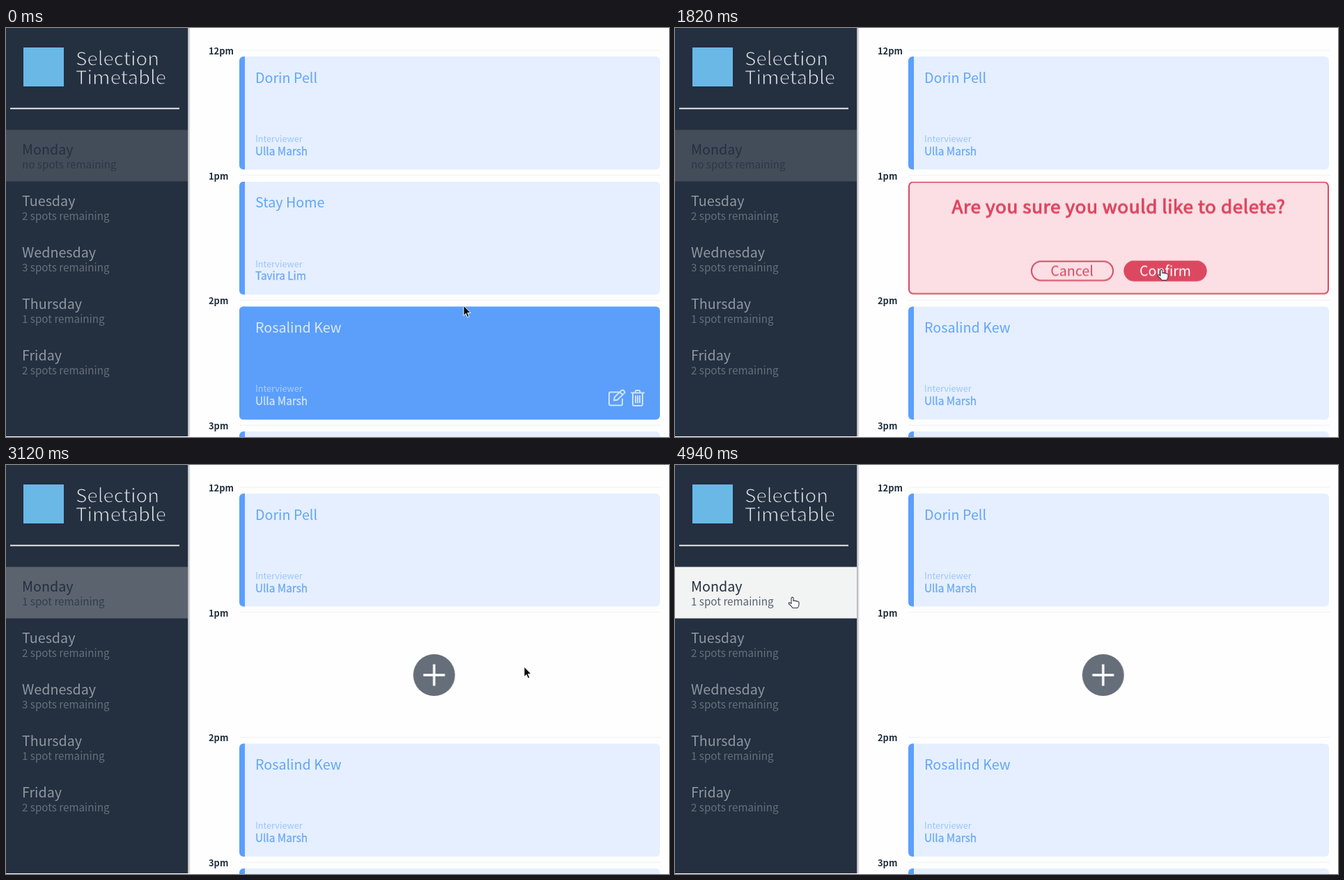
Write an HTML page that moves like this. It is 952x588 px and loops after 5.2 s.

```html
<!DOCTYPE html>
<html lang="en">
<head>
<meta charset="utf-8">
<title>Booking board</title>
<style>
  html, body { margin: 0; width: 100%; height: 100%; overflow: hidden; background: #fefefe; }
  svg { display: block; width: 100%; height: 100%; }
  text { font: 400 19.7px "Noto Sans CJK JP", "Noto Sans CJK SC", "Noto Sans CJK", "Open Sans", sans-serif; }

  /* A stroke in the background colour thins the letters, one in the text colour thickens them. */
  .title { font-size: 27.6px; fill: #dfe4e8; stroke: #242f3f; stroke-width: .9px; }
  .day { fill: #8f98a1; }
  .spots { font-size: 15.2px; fill: #66707b; }
  .panel text { fill: #222f3e; }
  .panel .spots { fill: #56616d; }
  .hour { font-size: 12.9px; font-weight: 700; fill: #222f3e; }
  .role { font-size: 12.7px; }
  .person { font-size: 15.3px; stroke-width: .3px; }
  .big { font-size: 26.2px; letter-spacing: .55px; stroke-width: 1px; }
  .mid { text-anchor: middle; }

  .booked .name { fill: #62a6f8; }
  .booked .role { fill: #9cc5fb; }
  .booked .person { fill: #6aa9f8; stroke: #6aa9f8; }
  .active .name { fill: #dbe9fe; }
  .active .role { fill: #a9cdfd; }
  .active .person { fill: #d5e5fe; stroke: #d5e5fe; }
  .icons { fill: none; stroke: #cfe2fe; stroke-width: 2; stroke-linejoin: round; stroke-linecap: round; }
  .danger { fill: #dd455e; stroke: #dd455e; }
  .label { fill: #dd455e; }
  .outline { fill: none; stroke: #dc4860; stroke-width: 2; }

  .anim { animation: 5.2s step-end infinite; }
  .third-active { animation-name: third-active; }
  .second-active { animation-name: second-active; }
  .confirm { animation-name: confirm; }
  .confirm-hot { animation-name: confirm-hot; }
  .deleting { animation-name: deleting; }
  .after { animation-name: after; }
  .before { animation-name: before; }
  .panel { animation-name: panel; }
  .cursor { animation-name: move; }
  .arrow { animation-name: arrow; }
  .hand { animation-name: hand; }
  .spin { animation: spin 1.04s steps(8) infinite; }

  @keyframes third-active { 0% { opacity: 1 } 2.5%, 100% { opacity: 0 } }
  @keyframes second-active { 0%, 20%, 100% { opacity: 0 } 2.5% { opacity: 1 } }
  @keyframes confirm { 0%, 40%, 100% { opacity: 0 } 20% { opacity: 1 } }
  @keyframes confirm-hot { 0%, 40%, 100% { opacity: 0 } 30% { opacity: 1 } }
  @keyframes deleting { 0%, 60%, 100% { opacity: 0 } 40% { opacity: 1 } }
  @keyframes after { 0% { opacity: 0 } 60%, 100% { opacity: 1 } }
  @keyframes before { 0% { opacity: 1 } 60%, 100% { opacity: 0 } }
  @keyframes panel { 0% { opacity: .155 } 60% { opacity: .27 } 62.5%, 100% { opacity: 1 } }
  @keyframes move {
    0% { transform: translate(657px, 399px) }
    2.5% { transform: translate(745px, 335px) }
    7.5% { transform: translate(793px, 292px) }
    12.5% { transform: translate(872px, 330px) }
    15% { transform: translate(907px, 351px) }
    25% { transform: translate(810px, 352px) }
    30% { transform: translate(697px, 347px) }
    40% { transform: translate(697px, 347px); animation-timing-function: steps(8) }
    60% { transform: translate(744px, 290px) }
    80% { transform: translate(409px, 274px) }
    87.5% { transform: translate(240px, 206px) }
    92.5% { transform: translate(185px, 194px) }
    95%, 100% { transform: translate(167px, 190px) }
  }
  @keyframes arrow {
    0%, 25%, 42.5% { opacity: 1 }
    15%, 30%, 87.5%, 100% { opacity: 0 }
  }
  @keyframes hand {
    0%, 25%, 42.5% { opacity: 0 }
    15%, 30%, 87.5%, 100% { opacity: 1 }
  }
  @keyframes spin { to { transform: rotate(360deg) } }
</style>
</head>
<body>
<svg viewBox="0 0 952 588">
  <defs>
    <linearGradient id="shade">
      <stop offset="0" stop-color="#222f3e" stop-opacity=".4"/>
      <stop offset="1" stop-color="#222f3e" stop-opacity="0"/>
    </linearGradient>
    <g id="icons" class="icons">
      <path d="M545 123H533a2 2 0 0 0-2 2V140a2 2 0 0 0 2 2H548a2 2 0 0 0 2-2V133"/>
      <path d="M538 135L539 130 549 120.500Q550.500 119.500 552 121L553 122Q554 123.500 553 124.500L543 134Z M546.500 123L550.500 127"/>
      <path d="M563 124H581 M568 124L569.500 120.500H574.500L576 124 M565 124V140.500a2 2 0 0 0 2 2H577a2 2 0 0 0 2-2V124 M569 128.500V138 M572 128.500V138 M575 128.500V138"/>
    </g>
  </defs>

  <rect width="952" height="588" fill="#fefefe"/>
  <rect x="261" width="4" height="587" fill="url(#shade)"/>
  <rect width="261" height="587" fill="#242f3f"/>
  <rect x="25" y="28" width="58" height="56" fill="#69b8e6"/>
  <text class="title" x="100" y="53.500">Selection</text>
  <text class="title" x="100" y="80.500">Timetable</text>
  <rect x="6" y="114.700" width="243" height="2" fill="#e6e9ec"/>

  <g class="panel anim">
    <rect y="146.500" width="261" height="74" fill="#f2f4f3"/>
    <text x="23" y="181.500">Monday</text>
    <text class="spots before anim" x="23" y="202">no spots remaining</text>
    <text class="spots after anim" x="23" y="202">1 spot remaining</text>
  </g>
  <g id="days"></g>
  <g id="slots"></g>

  <g class="confirm anim" transform="translate(335 220.500)">
    <rect x="1" y="1" width="602" height="160.500" rx="6" fill="#fbdfe4" stroke="#dc4860" stroke-width="2"/>
    <text class="big danger mid" x="302" y="46">Are you sure you would like to delete?</text>
    <rect class="outline" x="177" y="115" width="117" height="27.500" rx="13.700"/>
    <text class="label mid" x="235" y="135.500">Cancel</text>
    <rect class="outline" x="310.500" y="115" width="117" height="27.500" rx="13.700"/>
    <text class="label mid" x="369" y="135.500">Confirm</text>
    <g class="confirm-hot anim">
      <rect x="309.500" y="114" width="119" height="29.500" rx="14.700" fill="#dc4860"/>
      <text class="mid" x="369" y="135.500" fill="#fff">Confirm</text>
    </g>
  </g>

  <g class="deleting anim">
    <rect x="335" y="220.500" width="604" height="162.500" rx="6" fill="#242f3f"/>
    <g transform="translate(558 302)" fill="none">
      <circle r="20.500" stroke="#454e5b" stroke-width="4.500"/>
      <g class="spin">
        <circle r="20.500" stroke="#f2f3f4" stroke-width="4.500" pathLength="360" stroke-dasharray="97 263" transform="rotate(108)"/>
      </g>
    </g>
    <text class="big" x="610" y="312" fill="#f0f2f4" stroke="#f0f2f4">DELETING</text>
  </g>

  <g class="after anim" transform="translate(614.700 302)">
    <circle r="30" fill="#656e79"/>
    <path d="M-15.500 0H15.500M0-15.500V15.500" stroke="#fff" stroke-width="3.400"/>
  </g>

  <g class="cursor anim">
    <path class="arrow anim" d="M0 0V14.500L3.300 11.500 5.600 16.800 8 15.800 5.700 10.600H10.200Z" fill="#0b0b0d" stroke="#fff" stroke-width="1"/>
    <path class="hand anim" d="M0 1.200Q1.500-1 3 1.200V5.500Q4.500 4.300 5.800 5.700 7.200 4.800 8.400 6.300 10.200 5.500 11 7.500V11Q10.500 13.500 9 15.500H2Q0 12.500-3.500 9.800-4.500 8-2.500 7.800L0 9.300Z" fill="#fff" stroke="#343d49" stroke-width="1.100" stroke-linejoin="round"/>
  </g>
</svg>
<script>
  const PITCH = 179.7;
  const byId = id => document.getElementById(id);

  const days = [
    ["Tuesday", "2 spots"], ["Wednesday", "3 spots"], ["Thursday", "1 spot"], ["Friday", "2 spots"]
  ];
  byId("days").innerHTML = days.map(([day, spots], i) => {
    const y = 255.5 + i * 74.1;
    return `<text class="day" x="23" y="${y}">${day}</text>
      <text class="spots" x="23" y="${y + 20.5}">${spots} remaining</text>`;
  }).join("");

  const words = (name, person) => `
    <text class="name" x="23" y="37.8">${name}</text>
    <text class="role" x="23" y="123">Interviewer</text>
    <text class="person" x="23" y="141.5">${person}</text>`;

  const booked = (name, person) => `
    <path d="M8 0H6a6 6 0 0 0-6 6V156.500a6 6 0 0 0 6 6H8Z" fill="#5b9ffb"/>
    <path d="M8 0H598a6 6 0 0 1 6 6V156.500a6 6 0 0 1-6 6H8Z" fill="#e5efff"/>
    ${words(name, person)}`;

  const active = (name, person) => `
    <rect width="604" height="162.5" rx="6" fill="#5b9ffb"/>
    ${words(name, person)}<use href="#icons"/>`;

  const slots = [
    { hour: "12pm", name: "Dorin Pell", person: "Ulla Marsh" },
    { hour: "1pm", name: "Stay Home", person: "Tavira Lim", shown: "second-booked", hot: "second-active" },
    { hour: "2pm", name: "Rosalind Kew", person: "Ulla Marsh", hot: "third-active" },
    { hour: "3pm", name: "", person: "" }
  ];
  byId("slots").innerHTML = slots.map(({ hour, name, person, shown, hot }, i) => `
    <g transform="translate(0 ${i * PITCH})">
      <text class="hour" x="291" y="38">${hour}</text>
      <rect x="335" y="31.5" width="605" height="1" fill="#eeeff1"/>
      <g transform="translate(335 41)">
        <g class="booked ${shown ? "third-active anim" : ""}">${booked(name, person)}</g>
        ${hot ? `<g class="active anim ${hot}">${active(name, person)}</g>` : ""}
      </g>
    </g>`).join("");
</script>
</body>
</html>
```
